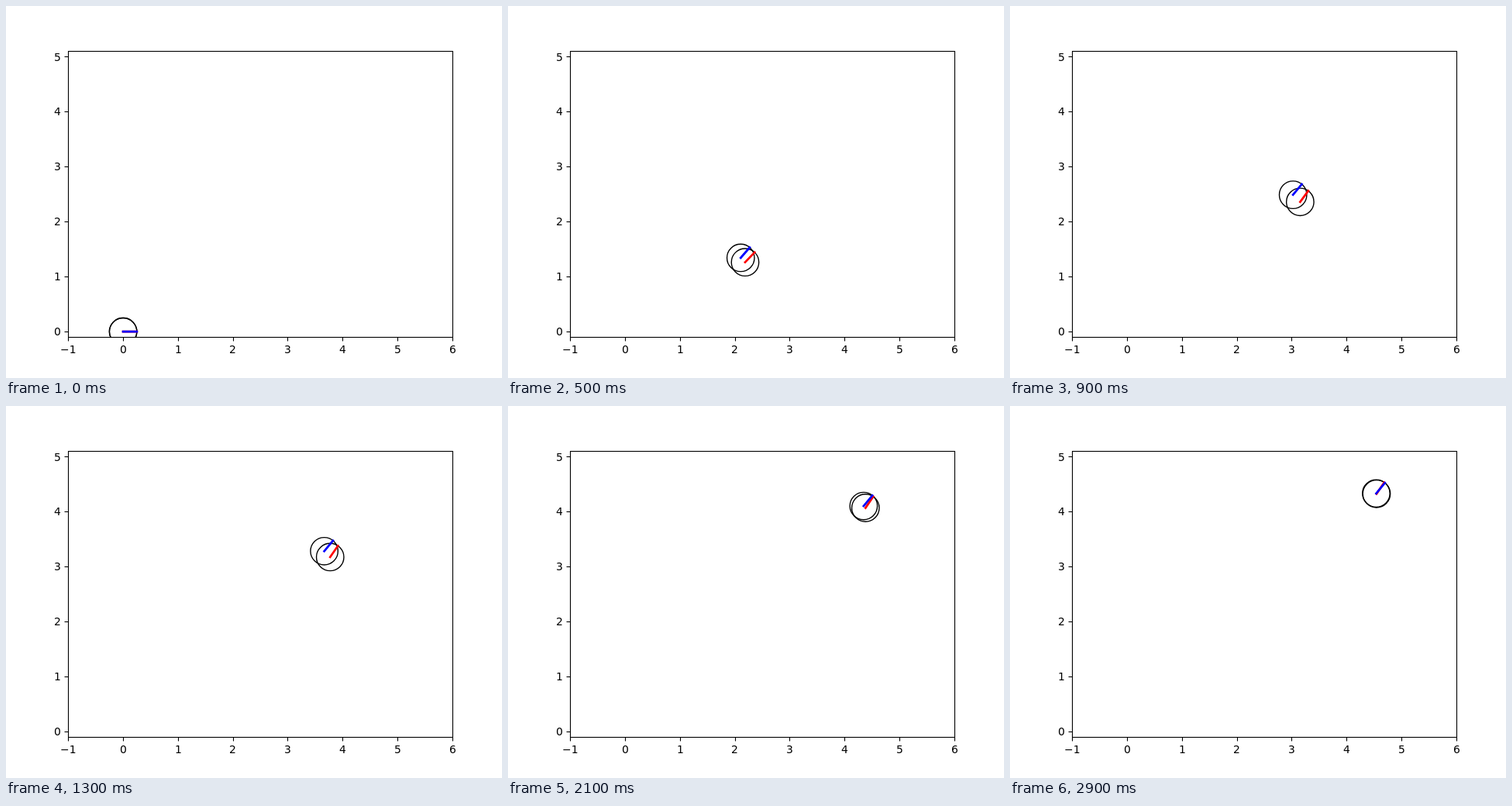
These frames come from a looping animation (640x480 px, 3000 ms). An HTML page:

```html
<!DOCTYPE html>
<html lang="en">
<head>
<meta charset="utf-8">
<title>Two robots</title>
<style>
  html, body { margin: 0; width: 100%; height: 100%; overflow: hidden; background: #fff; }
  svg { display: block; }
  text { font: 13.89px "DejaVu Sans", sans-serif; }
  .axis { fill: none; stroke: #000; stroke-width: 1.11; }
  circle { fill: none; stroke: #000; stroke-width: 1.39; }
  .nose { stroke-width: 2.78; stroke-linecap: square; }
</style>
</head>
<body>
<svg width="640" height="480" viewBox="0 0 640 480">
  <clipPath id="plot"><rect x="80" y="57.6" width="496" height="369.6"/></clipPath>
  <g id="robots" clip-path="url(#plot)"></g>
  <g id="axes"><rect class="axis" x="80.5" y="58.5" width="496" height="369"/></g>
</svg>
<script>
const UNIT = 496 / 7, X0 = 80 + UNIT, Y0 = 419.54, R = UNIT / 4;
const GOAL = { x: 472.7, y: 112.6 };
const STEP = 100, STEPS = 30;

const rad = deg => deg * Math.PI / 180;
const snap = v => Math.floor(v + 0.5) + 0.5;

function set(el, attrs) {
  for (const k in attrs) el.setAttribute(k, attrs[k]);
}

function add(parent, tag, attrs, text = "") {
  const el = document.createElementNS("http://www.w3.org/2000/svg", tag);
  set(el, attrs);
  el.textContent = text;
  return document.getElementById(parent).appendChild(el);
}

// Tick labels start on whole pixels; align is the share of the width left of x
function label(text, x, y, align) {
  const el = add("axes", "text", { y }, text);
  el.setAttribute("x", Math.round(x - el.getComputedTextLength() * align));
}

for (let n = -1; n <= 6; n++) {
  const x = X0 + n * UNIT;
  add("axes", "path", { class: "axis", d: `M${snap(x)} 427.5v5` });
  label(String(n).replace("-", "\u2212"), x + 0.27, 448, 0.5);
}
for (let n = 0; n <= 5; n++) {
  const y = Y0 - n * UNIT;
  add("axes", "path", { class: "axis", d: `M80.5 ${snap(y)}h-5` });
  label(String(n), 70.5, Math.round(y + 5.3), 1);
}

// Blue turns quickly toward the goal, then closes in on it ever more slowly
function blue(s) {
  const turn = Math.exp(-0.7 * s);
  const dist = (0.158 * (36.5 - s)) ** 3.5 - 1.5 - 14.1 * Math.exp(-2 * s);
  const bearing = rad(49.8 + 0.005 * dist - 8.3 * turn);
  return {
    x: GOAL.x - dist * Math.cos(bearing),
    y: GOAL.y + dist * Math.sin(bearing),
    heading: 50.5 * (1 - turn)
  };
}

// Red turns later, so it drifts out to the lower right and merges back
function red(s) {
  const { x, y } = blue(s), u = s / 9.3;
  const gap = 9.2 * u ** 3 * Math.exp(3 * (1 - u));
  return { x: x + gap, y: y + gap, heading: 56 * (1 - Math.exp(-0.35 * s)) };
}

const robots = [["red", red], ["blue", blue]].map(([stroke, pose]) => ({
  pose,
  body: add("robots", "circle", { r: R }),
  nose: add("robots", "line", { class: "nose", stroke })
}));
document.getElementById("robots").append(...robots.map(r => r.nose));

function draw(s) {
  for (const { pose, body, nose } of robots) {
    const { x, y, heading } = pose(s), a = rad(heading);
    set(body, { cx: x, cy: y });
    set(nose, { x1: x, y1: y, x2: x + R * Math.cos(a), y2: y - R * Math.sin(a) });
  }
}

const start = performance.now();
function tick() {
  draw(Math.floor((performance.now() - start) / STEP) % STEPS);
  requestAnimationFrame(tick);
}
tick();
</script>
</body>
</html>
```
